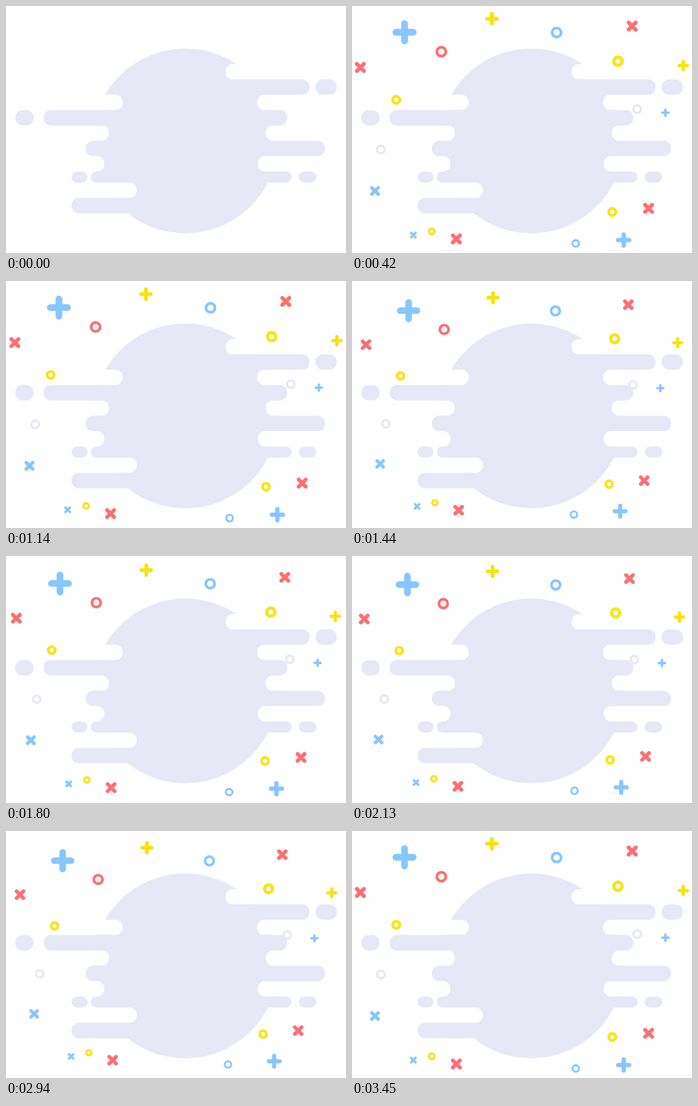
An HTML page with a canvas for the animation above (3600 ms loop, 550 by 400 pixels).

```html
<!DOCTYPE html>
<html lang="en">
<head>
<meta charset="utf-8">
<title>Pulsing confetti</title>
<style>
  html, body { margin: 0; width: 100%; height: 100%; overflow: hidden; background: #fff; }
  canvas { display: block; }
</style>
</head>
<body>
<canvas id="stage" width="550" height="400"></canvas>
<script>
const ctx = document.getElementById('stage').getContext('2d');
const LOOP = 3600, STEP = 30, APPEAR = 90, LAST_STEP = 3450;
const PULSE = 750, PULSE_OFFSET = 60, MIN_SCALE = 0.965;
const CENTER = { x: 275.5, y: 201 };
const LILAC = '#e7e8f6', BLUE = '#88c6ff', RED = '#ff6e73',
      YELLOW = '#fae10a', LEMON = '#f5e61c', WHITE = '#fff';

// The cloud is a disc cut into rows; notches and bars alternate down each side.
const DISC = { x: 290, y: 218.5, r: 149.7 };
const ROWS_TOP = 94, ROW = 24.85, THIN_ROW = 18, THIN_INDEX = 7;
const RIGHT_ENDS = [355.3, 491, 406.2, 455, 420.2, 516, 407.3, 462];
const LEFT_ENDS = [188.7, 61, 166.4, 129, 159, 137, 211.5, 106];
const LEFT_FIRST_ROW = 2;

function rowBox(i) {
  const top = ROWS_TOP + i * ROW - (i > THIN_INDEX ? ROW - THIN_ROW : 0);
  return { top, height: i === THIN_INDEX ? THIN_ROW : ROW };
}

function pill(row, left, right, color) {
  const { top, height } = rowBox(row);
  ctx.fillStyle = color;
  ctx.beginPath();
  ctx.roundRect(left, top, right - left, height, Math.min(height / 2, 11.7));
  ctx.fill();
}

function drawSide(ends, firstRow, outside) {
  for (const isBar of [false, true]) {
    ends.forEach((end, i) => {
      if ((i % 2 === 1) !== isBar) return;
      const other = isBar ? DISC.x : outside;
      pill(firstRow + i, Math.min(end, other), Math.max(end, other), isBar ? LILAC : WHITE);
    });
  }
}

function drawCloud() {
  ctx.fillStyle = LILAC;
  ctx.beginPath();
  ctx.arc(DISC.x, DISC.y, DISC.r, 0, Math.PI * 2);
  ctx.fill();
  drawSide(RIGHT_ENDS, 0, 500);
  drawSide(LEFT_ENDS, LEFT_FIRST_ROW, 90);
  pill(1, 501, 535, LILAC);
  pill(3, 15, 44.5, LILAC);
  pill(THIN_INDEX, 106, 132, LILAC);
  pill(THIN_INDEX, 473.5, 502, LILAC);
}

function plus(x, y, half, color, thickness = 0.56) {
  const width = half * thickness, d = half - width / 2;
  ctx.strokeStyle = color;
  ctx.lineWidth = width;
  ctx.lineCap = 'round';
  ctx.beginPath();
  ctx.moveTo(x - d, y);
  ctx.lineTo(x + d, y);
  ctx.moveTo(x, y - d);
  ctx.lineTo(x, y + d);
  ctx.stroke();
}

function cross(x, y, half, color) {
  ctx.save();
  ctx.translate(x, y);
  ctx.rotate(Math.PI / 4);
  plus(0, 0, half * 1.27, color, 0.55);
  ctx.restore();
}

function ring(x, y, radius, color) {
  const width = radius * (color === LEMON ? 0.6 : 0.47);
  ctx.strokeStyle = color;
  ctx.lineWidth = width;
  ctx.beginPath();
  ctx.arc(x, y, radius - width / 2, 0, Math.PI * 2);
  ctx.stroke();
}

function drawPieces() {
  plus(85, 42.5, 19.5, BLUE);
  plus(439.5, 379, 12.5, BLUE);
  plus(507, 172.7, 7, BLUE);
  plus(226.3, 20.7, 11, YELLOW);
  plus(536, 96.3, 9.3, YELLOW);

  cross(453.2, 32.5, 8.8, RED);
  cross(13.5, 99.5, 8.8, RED);
  cross(168.8, 377.3, 8.8, RED);
  cross(479.8, 327.7, 8.8, RED);
  cross(37.2, 299.6, 8, BLUE);
  cross(99.2, 371, 5.6, BLUE);

  ring(144.5, 74, 9.5, RED);
  ring(331, 43, 9.5, BLUE);
  ring(362, 384.6, 7, BLUE);
  ring(461.3, 167, 8, LILAC);
  ring(46.6, 232.4, 8, LILAC);
  ring(430.3, 89.6, 9.5, LEMON);
  ring(71.5, 152, 8, LEMON);
  ring(421, 333.6, 8, LEMON);
  ring(129, 364.7, 6.3, LEMON);
}

// Accelerating swell, short hold, quicker fall.
function pulseAt(time) {
  const phase = (time + PULSE_OFFSET) % PULSE;
  const rise = (phase / 480) ** 1.5;
  const fall = ((PULSE - phase) / 240) ** 0.85;
  return Math.min(1, rise, fall);
}

function drawConfetti(time) {
  const scale = MIN_SCALE + (1 - MIN_SCALE) * pulseAt(time);
  ctx.save();
  ctx.translate(CENTER.x, CENTER.y);
  ctx.scale(scale, scale);
  ctx.translate(-CENTER.x, -CENTER.y);
  drawPieces();
  ctx.restore();
}

function draw(now) {
  const time = Math.min(Math.floor(now % LOOP / STEP) * STEP, LAST_STEP);
  ctx.fillStyle = WHITE;
  ctx.fillRect(0, 0, 550, 400);
  drawCloud();
  if (time >= APPEAR) drawConfetti(time);
}

const start = performance.now();
function tick() {
  draw(performance.now() - start);
  requestAnimationFrame(tick);
}
tick();
</script>
</body>
</html>
```
